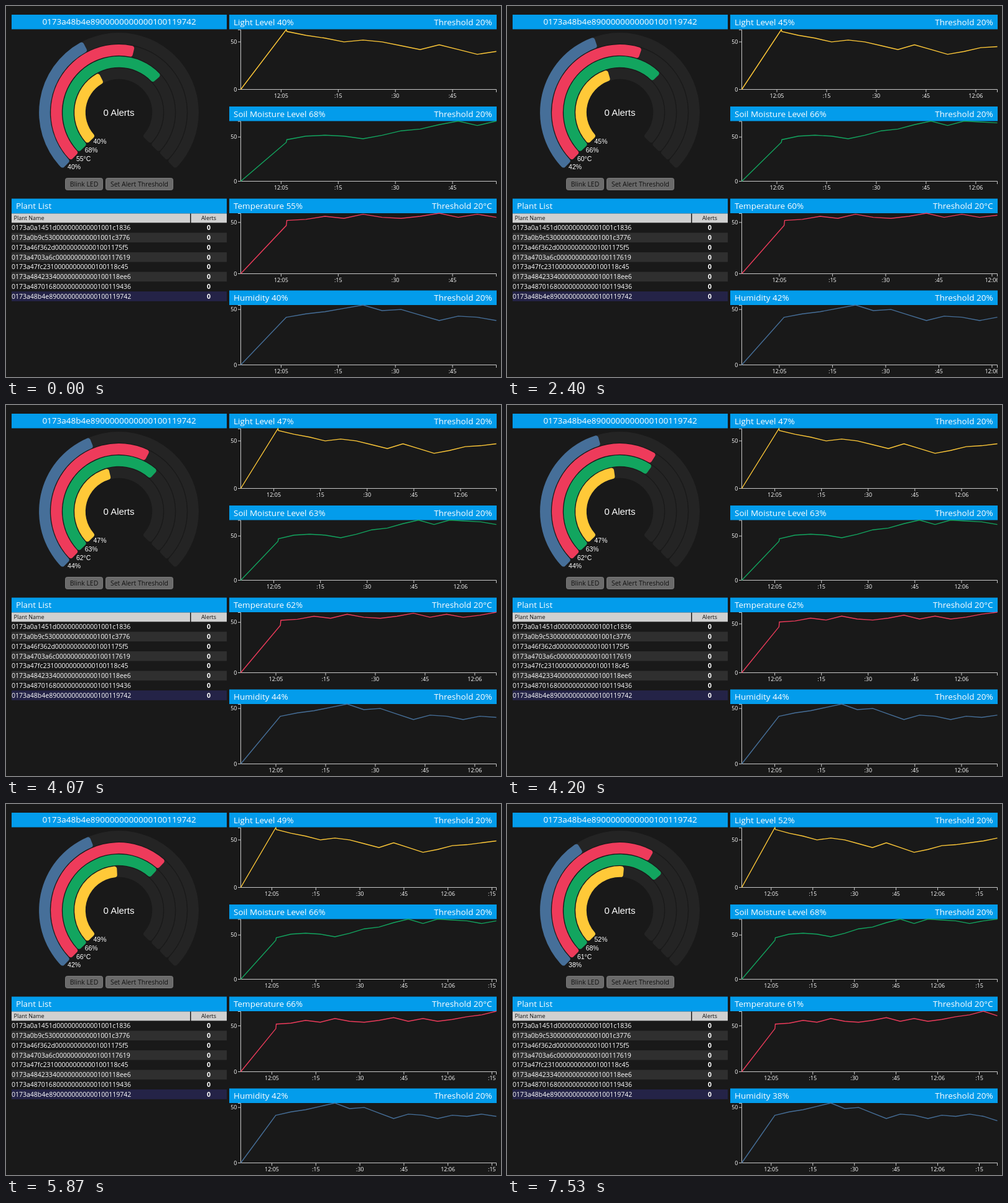
Recreate the animation shown at these times as an HTML page. Size 796 by 598 pixels, loop 8 s.

```html
<!DOCTYPE html>
<html lang="en">
<head>
<meta charset="utf-8">
<title>Plant monitor</title>
<style>
html, body { margin: 0; width: 100%; height: 100%; overflow: hidden; background: #191919; }
svg { display: block; width: 796px; height: 598px; font-family: "Open Sans", sans-serif; }
.title { font-size: 13.5px; fill: #fff; }
.row { font-size: 10.5px; font-weight: 500; fill: #fff; }
.head { font-size: 9px; fill: #111; }
.btn { font-size: 10.5px; fill: #111; }
.tick { font-size: 9px; fill: #fff; }
.gauge { font-family: "Liberation Sans", Arial, sans-serif; fill: #fff; }
.axis { fill: none; stroke: #c8c8c8; stroke-width: 1; }
.line { fill: none; stroke-width: 1.4; }
</style>
</head>
<body>
<svg id="stage" viewBox="0 0 796 598">
  <defs><clipPath id="clip"><rect x="355" y="0" width="434" height="598"/></clipPath></defs>
  <g id="fixed"></g>
  <g id="dial"></g>
  <g id="charts" clip-path="url(#clip)"></g>
</svg>
<script>
const LOOP = 8000, BLUE = '#039ceb';

// Seconds are counted from 12:05:00; a reading arrives every 5 s.
const X0 = 377.5, X1 = 788.5, START = -10.6, FIRST = 1.5, STEP = 5, KNOWN = 12;

const series = [
  { name: 'Light Level', unit: '%', color: '#ffc938', bar: 14, top: 38, base: 134.5, lead: 63,
    data: [61, 57, 54, 50, 52, 50, 46, 42, 47, 42, 37, 40, 44, 45, 47, 49, 52] },
  { name: 'Soil Moisture Level', unit: '%', color: '#12a55f', bar: 162, top: 185.5, base: 282.5, lead: 44,
    data: [47, 51, 52, 51, 48, 52, 57, 59, 64, 68, 63, 68, 67, 66, 63, 66, 68] },
  { name: 'Temperature', unit: '°C', color: '#ee3b5b', bar: 310.5, top: 334, base: 431.5, lead: 47,
    data: [52, 53, 56, 54, 58, 55, 54, 56, 59, 55, 58, 55, 57, 60, 62, 66, 61] },
  { name: 'Humidity', unit: '%', color: '#466f99', bar: 458.5, top: 482, base: 578.5, lead: 43,
    data: [43, 46, 48, 51, 54, 49, 50, 45, 40, 44, 43, 40, 43, 42, 44, 42, 38] }
];

const plants = [
  ['0173a0a1451d', '1001c1836'], ['0173a0b9c530', '1001c3776'],
  ['0173a46f362d', '1001175f5'], ['0173a4703a6c', '100117619'],
  ['0173a47fc231', '100118c45'], ['0173a4842334', '100118ee6'],
  ['0173a4870168', '100119436'], ['0173a48b4e89', '100119742']
].map(([a, b]) => a + '0'.repeat(11) + b);

// [time, update, phase]: 1 = labels and upper charts, 2 = all charts, 3 = dial settled
const steps = [
  [0, 0, 3], [800, 1, 2], [870, 1, 3],
  [2400, 2, 1], [2465, 2, 2], [2530, 2, 3],
  [4070, 3, 1], [4135, 3, 2], [4200, 3, 3],
  [5730, 4, 1], [5800, 4, 2], [5870, 4, 3],
  [7400, 5, 1], [7465, 5, 2], [7530, 5, 3]
];

const $ = id => document.getElementById(id);
const rect = (x, y, w, h, fill, extra = '') =>
  `<rect x="${x}" y="${y}" width="${w}" height="${h}" fill="${fill}" ${extra}/>`;
const text = (x, y, s, cls, anchor = 'start', extra = '') =>
  `<text x="${x}" y="${y}" class="${cls}" text-anchor="${anchor}" ${extra}>${s}</text>`;

// Ring segment with rounded corners; angles in degrees clockwise from the top.
function segment(r, R, from, to, fill) {
  const c = 4, rad = Math.PI / 180, a = from * rad, b = to * rad;
  const pt = (d, t) => `${(181.5 + d * Math.sin(t)).toFixed(2)} ${(171.5 - d * Math.cos(t)).toFixed(2)}`;
  const o = Math.asin(c / (R - c)), i = Math.asin(c / (r + c));
  const od = Math.sqrt((R - c) ** 2 - c * c), id = Math.sqrt((r + c) ** 2 - c * c);
  const arc = (q, big, dir, d, t) => `A${q} ${q} 0 ${big} ${dir} ${pt(d, t)}`;
  const bigO = b - a - 2 * o > Math.PI ? 1 : 0, bigI = b - a - 2 * i > Math.PI ? 1 : 0;
  return `<path fill="${fill}" d="M${pt(od, a)}${arc(c, 0, 1, R, a + o)}${arc(R, bigO, 1, R, b - o)}` +
    `${arc(c, 0, 1, od, b)}L${pt(id, b)}${arc(c, 0, 1, r, b - i)}` +
    `${arc(r, bigI, 0, r, a + i)}${arc(c, 0, 1, id, a)}Z"/>`;
}

function drawFixed() {
  let s = rect(9, 14, 346, 23.5, BLUE) + text(182, 30.3, plants[7], 'title', 'middle');
  for (const [x, w, label] of [[95.5, 60, 'Blink LED'], [160.5, 108, 'Set Alert Threshold']])
    s += rect(x, 277.5, w, 19, '#6a6a6a', 'rx="3" stroke="#7c7c7c"') +
      text(x + w / 2, 290.8, label, 'btn', 'middle');
  s += rect(9, 310.5, 346, 24, BLUE) + text(16, 327, 'Plant List', 'title');
  s += rect(9, 334.5, 287, 15, '#d0d0d0') + rect(297.5, 334.5, 57.5, 15, '#d0d0d0');
  s += text(12.5, 344.5, 'Plant Name', 'head') + text(326, 344.5, 'Alerts', 'head', 'middle');
  plants.forEach((id, i) => {
    const y = 349.7 + 15.77 * i;
    const fill = i === 7 ? '#242347' : i % 2 ? '#2f2f2f' : '#191919';
    s += rect(9, y, 346, 15.77, fill) + text(9, y + 11.6, id, 'row') +
      text(326, y + 11.6, '0', 'row', 'middle', 'style="font-weight:700"');
  });
  series.forEach(c => {
    s += rect(359, c.bar, 430, 23.5, BLUE) +
      text(781.5, c.bar + 16.5, 'Threshold 20' + c.unit, 'title', 'end');
  });
  $('fixed').innerHTML = s;
}

function drawDial(update, phase) {
  let s = '';
  series.forEach((c, k) => {
    const r = 53.7 + 19 * k, R = r + 17.7;
    const now = c.data[KNOWN - 1 + update], old = c.data[KNOWN - 1 + Math.max(0, update - 1)];
    const v = old + (now - old) * [0, 0, 0.5, 1][phase];
    s += segment(r, R, -135, 135, '#242424') + segment(r, R, -135, -135 + 2.7 * v, c.color);
  });
  series.forEach((c, k) => {
    s += text(140.5 - 13.8 * k, 222 + 13.8 * k, c.data[KNOWN - 1 + update] + c.unit,
      'gauge', 'start', 'font-size="10.5"');
  });
  $('dial').innerHTML = s + text(181.5, 176.5, '0 Alerts', 'gauge', 'middle', 'font-size="15"');
}

function chart(c, update) {
  const count = KNOWN + update, data = c.data.slice(0, count);
  const end = FIRST + STEP * (count - 1);
  const x = t => +(X0 + (t - START) / (end - START) * (X1 - X0)).toFixed(2);
  const max = Math.max(c.lead, ...data);
  const y = v => +(c.base - v / max * (c.base - c.top)).toFixed(2);

  let axis = `M373 ${c.top + .5}H377.5V${c.base}M373 ${c.base}H788.5v4.5M373 ${y(50)}h4.5`, s = '';
  s += text(371.5, c.base + 3, '0', 'tick', 'end') + text(371.5, y(50) + 3, '50', 'tick', 'end');
  for (let t = 0; t <= end; t += 15) {
    const label = t % 60 ? ':' + t % 60 : '12:0' + (5 + t / 60);
    axis += `M${x(t)} ${c.base}v4.5`;
    s += text(x(t), c.base + 13.2, label, 'tick', 'middle');
  }
  const pts = [[START, 0], [FIRST - .15, c.lead], ...data.map((v, i) => [FIRST + STEP * i, v])];
  return `<path class="axis" d="${axis}"/>${s}<polyline class="line" stroke="${c.color}" points="` +
    pts.map(([t, v]) => x(t) + ',' + y(v)).join(' ') + '"/>';
}

function drawCharts(update, phase) {
  $('charts').innerHTML = series.map((c, k) => {
    const late = phase === 1 && k > 1;
    return text(366, c.bar + 16.5, `${c.name} ${c.data[KNOWN - 1 + update]}%`, 'title') +
      chart(c, late ? update - 1 : update);
  }).join('');
}

let shown = null;
const began = performance.now();
function tick() {
  const t = (performance.now() - began) % LOOP;
  const step = steps.findLast(s => s[0] <= t) || steps[0];
  if (step !== shown) {
    shown = step;
    drawDial(step[1], step[2]);
    drawCharts(step[1], step[2]);
  }
  requestAnimationFrame(tick);
}

drawFixed();
tick();
</script>
</body>
</html>
```
